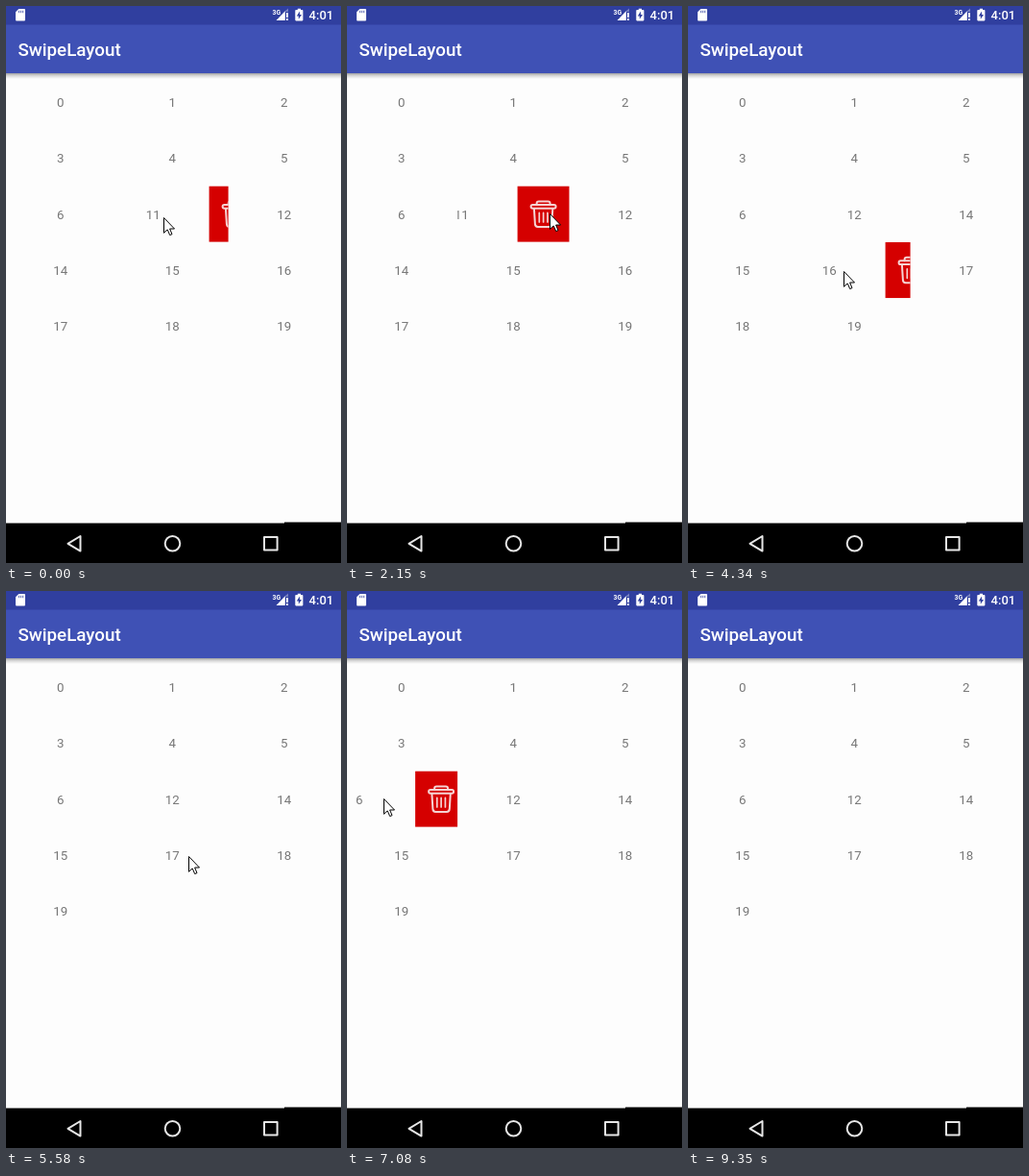
Recreate the animation shown at these times as an HTML page. Size 349 by 580 pixels, loop 9.88 s.

```html
<!DOCTYPE html>
<html lang="en">
<head>
<meta charset="utf-8">
<title>SwipeLayout</title>
<style>
  html, body { margin: 0; width: 100%; height: 100%; overflow: hidden; background: #fdfdfd; }
  #stage { display: block; }
  text { font-family: Roboto, sans-serif; }
  .num { font-size: 13.3px; fill: #777; text-anchor: middle; }
  .bold { font-weight: 500; fill: #fff; }
  .nav { fill: none; stroke: #e6e6e6; stroke-width: 2; stroke-linejoin: round; }
  .bin { fill: none; stroke: #f6d3d3; stroke-width: 2; stroke-linecap: round; stroke-linejoin: round; }
</style>
</head>
<body>
<svg id="stage" width="349" height="580" viewBox="0 0 349 580">
  <defs>
    <linearGradient id="shade" x2="0" y2="1">
      <stop offset="0" stop-color="#000" stop-opacity=".36"/>
      <stop offset=".45" stop-color="#000" stop-opacity=".14"/>
      <stop offset="1" stop-color="#000" stop-opacity="0"/>
    </linearGradient>
    <g id="panel">
      <rect width="54.2" height="58.4" fill="#d50000"/>
      <g class="bin">
        <path d="M20 19.500v-1.200q0-2.300 2.300-2.300h9.400q2.300 0 2.300 2.300v1.200"/>
        <rect x="14" y="19.500" width="26" height="3.800" rx="1.900"/>
        <path d="M17.300 23.500l1 16q.2 3 2.900 3h11.600q2.700 0 2.900-3l1-16"/>
        <path d="M22.700 28v9.500M27 28v9.500M31.300 28v9.500" stroke-width="1.700"/>
      </g>
    </g>
  </defs>

  <rect width="349" height="580" fill="#fdfdfd"/>
  <g id="grid"></g>

  <rect y="70" width="349" height="6" fill="url(#shade)"/>
  <rect width="349" height="70" fill="#3f51b5"/>
  <rect width="349" height="19.5" fill="#303f9f"/>
  <text class="bold" x="12.4" y="52.4" font-size="18.8">SwipeLayout</text>

  <g fill="#fff">
    <path d="M13.3 3H19q1 0 1 1v10.4q0 1-1 1h-8q-1 0-1-1V6.3z"/>
    <path d="M13.6 4.8v2.4M15.6 4.8v2.4M17.6 4.8v2.4" stroke="#303f9f" stroke-width=".8"/>
    <text x="277.5" y="8.6" font-size="6.8" font-weight="700">3G</text>
    <path d="M281.5 15L290.8 5.2V15z"/>
    <path d="M290.8 5.2L294 2.6V6h-3.2z" opacity=".35"/>
    <path d="M292 7h2v5h-2zM292 13h2v2h-2z"/>
    <path d="M303.8 2.8h3.2v1.3h1.6q.8 0 .8.8v9.7q0 .8-.8.8h-6.5q-.8 0-.8-.8V4.9q0-.8.8-.8h1.7z"/>
    <path d="M306 5.6l-3.2 4.8h2v3.4l3.2-4.9h-2z" fill="#303f9f"/>
    <text class="bold" x="315.6" y="14" font-size="13">4:01</text>
  </g>

  <path d="M0 538.4h290v-1h59V580H0z"/>
  <g class="nav">
    <path d="M64.5 559.8L77.5 552v15.6z"/>
    <circle cx="173.5" cy="559.8" r="7.8"/>
    <rect x="269" y="553" width="13.6" height="13.6"/>
  </g>

  <path id="cursor" d="M.5.5V16.3L4.2 12.9L6.7 18.6L9 17.6L6.6 12H11.5z"
        fill="#fff" stroke="#000"/>
</svg>
<script>
const LOOP = 9880;
const FRAME = 125, SLACK = 15;
const COL = 116.5, ROW = 58.4, LEFT = -1.4, TOP = 70.6;
const OPEN = -54;
const SVG = 'http://www.w3.org/2000/svg';

const linear = p => p;
const easeIn = p => p * p;
const easeOut = p => 1 - (1 - p) ** 2;
const smooth = p => p * p * (3 - 2 * p);
const lerp = (a, b, p) => a + (b - a) * p;

// Recorded progress: rises in whole frames, the first at start and the last at end.
function stepped(start, end, t) {
  if (t < start) return 0;
  const gaps = Math.round((end - start) / FRAME);
  if (!gaps) return 1;
  const frame = Math.floor((t - start + SLACK) / (end - start) * gaps);
  return Math.min(1, (frame + 1) / (gaps + 1));
}

const move = (start, end, x, y, ease = linear) => ({ start, end, x, y, ease });
const jump = (time, x, y) => move(time, time, x, y);

const moves = [
  move(640, 760, 163, 222),
  move(910, 1150, 210, 217),
  jump(2150, 211, 216),
  move(3260, 3680, 201, 275, smooth),
  move(3960, 4340, 162, 276),
  move(4740, 4980, 190, 276),
  move(5880, 6000, 164, 172),
  move(6150, 6280, 146, 164),
  move(6420, 6780, 90, 214),
  move(6930, 7080, 38, 216, easeIn),
  move(7230, 7470, 117, 285, easeIn),
  jump(7590, 204, 310),
  move(7740, 7980, 202, 266),
  jump(8810, 201, 229),
  jump(8930, 282, 424),
  jump(9080, 305, 552),
  move(9230, 9350, 313, 600)
];

// The cell follows the pointer from grabX, then settles open.
const swipes = [
  { id: 11, start: 0, grabX: 184, release: 250, rest: 370, removed: 2580 },
  { id: 16, start: 3960, grabX: 188, release: 4460, rest: 4460, removed: 5580 },
  { id: 6, start: 6930, grabX: 82, release: 7230, rest: 7230, close: 8130, closed: 8250 }
];

function pointerAt(t) {
  let x = 164, y = 220;
  for (const m of moves) {
    const p = m.ease(stepped(m.start, m.end, t));
    x = lerp(x, m.x, p);
    y = lerp(y, m.y, p);
  }
  return { x, y };
}

function offsetOf(s, t) {
  if (!s || t < s.start) return 0;
  const dragged = pointerAt(Math.min(t, s.release - 1)).x - s.grabX;
  const opened = lerp(Math.min(0, dragged), OPEN, easeOut(stepped(s.release, s.rest, t)));
  return s.close ? lerp(opened, 0, easeOut(stepped(s.close, s.closed, t))) : opened;
}

function make(tag, attrs, parent) {
  const el = document.createElementNS(SVG, tag);
  for (const key in attrs) el.setAttribute(key, attrs[key]);
  return parent.appendChild(el);
}

const grid = document.getElementById('grid');
const cursor = document.getElementById('cursor');
const deletedBefore = [7, 8, 9, 10, 13];

const cells = [...Array(20).keys()].filter(id => !deletedBefore.includes(id)).map(id => {
  const box = make('svg', { width: COL, height: ROW, overflow: 'hidden' }, grid);
  const content = make('g', {}, box);
  make('text', { class: 'num', x: COL / 2, y: 34.3 }, content).textContent = id;
  make('use', { href: '#panel', x: COL }, content);
  return { box, content, swipe: swipes.find(s => s.id === id) };
});

function draw(t) {
  const { x, y } = pointerAt(t);
  cursor.setAttribute('transform', `translate(${Math.round(x)} ${Math.round(y)})`);

  let slot = 0;
  for (const { box, content, swipe } of cells) {
    const gone = t >= swipe?.removed;
    box.style.display = gone ? 'none' : 'inline';
    if (gone) continue;
    box.setAttribute('x', LEFT + slot % 3 * COL);
    box.setAttribute('y', TOP + Math.floor(slot / 3) * ROW);
    content.setAttribute('transform', `translate(${offsetOf(swipe, t)} 0)`);
    slot++;
  }
}

const start = performance.now();
function tick() {
  draw((performance.now() - start) % LOOP);
  requestAnimationFrame(tick);
}
tick();
</script>
</body>
</html>
```
